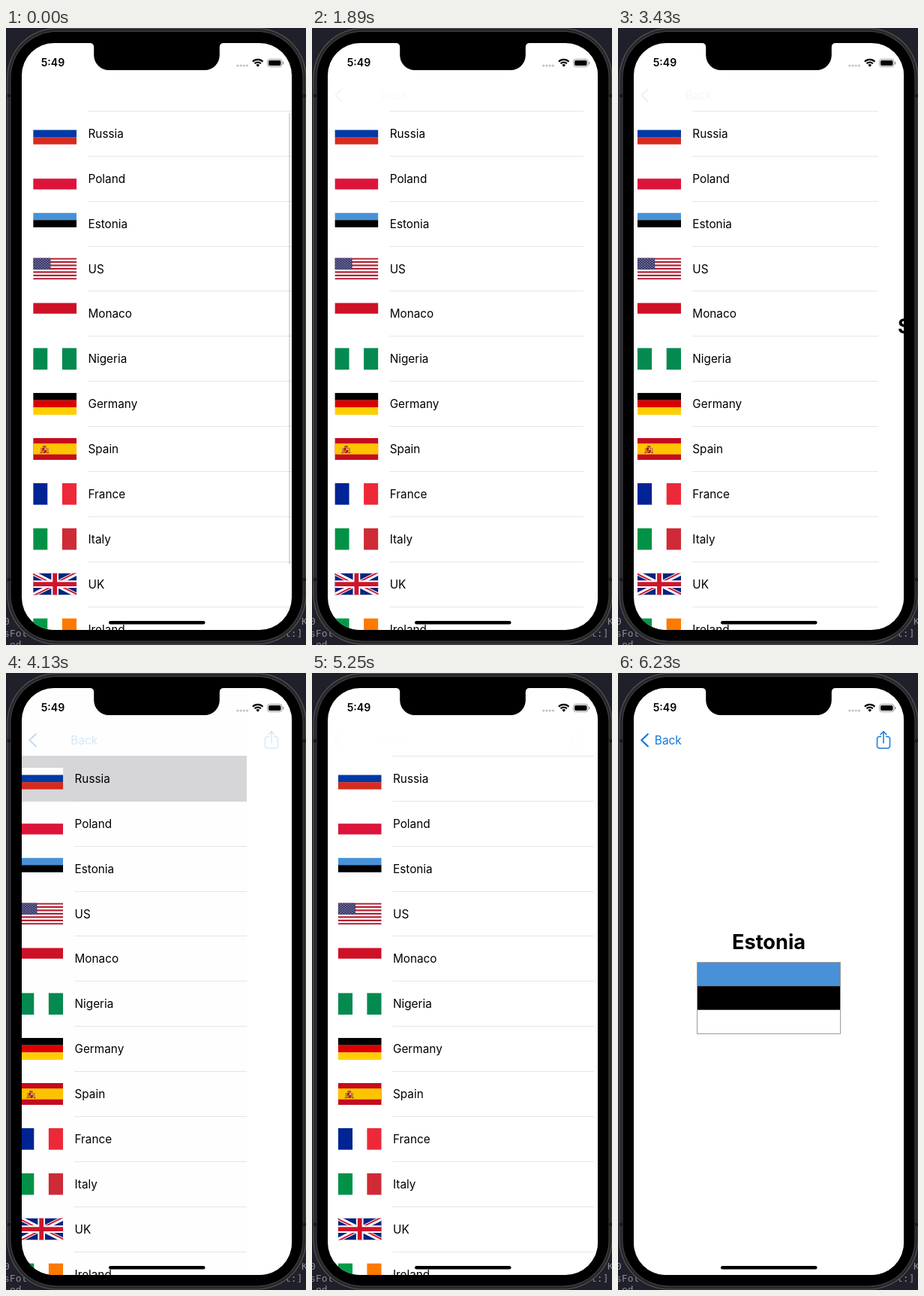
Animation, 400 px wide and 820 px high, one loop 6.86 s. Source, as an HTML page with a canvas:

```html
<!DOCTYPE html>
<html lang="en">
<head>
<meta charset="utf-8">
<title>Flag list</title>
<style>
  html, body { margin: 0; width: 100%; height: 100%; overflow: hidden; background: #20202b; }
  canvas { display: block; width: 400px; height: 820px; }
</style>
</head>
<body>
<canvas id="stage" width="400" height="820"></canvas>
<script>
const ctx = document.getElementById('stage').getContext('2d');
const LOOP = 6860, STEP = 70;
const SCREEN = { x: 21, y: 20, w: 360, h: 780 };
const ROW_TOP = 110, ROW_H = 59.87;
const SANS = 'Inter, "Liberation Sans", sans-serif';
const MONO = '"DejaVu Sans Mono", monospace';
const BLUE = '#1279dc';

const rows = [
  { name: 'Russia', bands: ['#fff', '#0039a6', '#d62b1f'] },
  { name: 'Poland', bands: ['#fff', '#dc143c'] },
  { name: 'Estonia', bands: ['#4891d9', '#000', '#fff'] },
  { name: 'US', draw: drawStarsAndStripes },
  { name: 'Monaco', bands: ['#ce1126', '#fff'] },
  { name: 'Nigeria', upright: true, bands: ['#048a51', '#fff', '#048a51'] },
  { name: 'Germany', bands: ['#000', '#dd0000', '#ffce00'] },
  { name: 'Spain', draw: drawSpain },
  { name: 'France', upright: true, bands: ['#002395', '#fff', '#ed2939'] },
  { name: 'Italy', upright: true, bands: ['#009246', '#fff', '#ce2b37'] },
  { name: 'UK', draw: drawUnion },
  { name: 'Ireland', upright: true, bands: ['#009a49', '#fff', '#ff7900'] }
];

// Each visit opens a detail page; only some of them load successfully.
const visits = [
  { row: 0, tap: 490, push: 742, press: 1540, pop: 1635 },
  { row: 0, tap: 2120, push: 2350, press: 3080, pop: 3213 },
  { row: 0, tap: 3860, push: 4090, press: 4830, pop: 4907, loaded: true },
  { row: 2, tap: 5480, push: 5710, press: Infinity, pop: Infinity, loaded: true }
];

function rect(x, y, w, h, color) {
  ctx.fillStyle = color;
  ctx.fillRect(x, y, w, h);
}

function roundRect(x, y, w, h, r, color) {
  ctx.beginPath();
  ctx.roundRect(x, y, w, h, r);
  ctx.fillStyle = color;
  ctx.fill();
}

function line(points, color, width) {
  ctx.beginPath();
  points.forEach(([x, y], i) => i ? ctx.lineTo(x, y) : ctx.moveTo(x, y));
  ctx.strokeStyle = color;
  ctx.lineWidth = width;
  ctx.stroke();
}

function text(str, x, y, font, color, align = 'left') {
  ctx.font = font;
  ctx.fillStyle = color;
  ctx.textAlign = align;
  ctx.fillText(str, x, y);
}

// Critically damped spring, 0 to 1.
function spring(ms) {
  const k = 18.26 * Math.max(0, ms) / 1000;
  return 1 - (1 + k) * Math.exp(-k);
}

function drawStarsAndStripes(w, h) {
  const s = h / 13;
  rect(0, 0, w, h, '#fff');
  for (let i = 0; i < 13; i += 2) rect(0, i * s, w, s, '#b22234');
  rect(0, 0, w * 0.4, s * 7, '#3c3b6e');
  for (let j = 0; j < 9; j++) {
    for (let i = j % 2; i < 11; i += 2) {
      rect(1.4 + i * 1.95, 1.2 + j * 1.6, 0.8, 0.8, '#fff');
    }
  }
}

function drawSpain(w, h) {
  rect(0, 0, w, h, '#c60b1e');
  rect(0, h / 4, w, h / 2, '#ffc400');
  rect(10, 13, 1.3, 7, '#a4705c');
  rect(19, 13, 1.3, 7, '#a4705c');
  rect(9, 19, 3, 1.2, '#8c4a3a');
  rect(18, 19, 3, 1.2, '#8c4a3a');
  roundRect(12, 13, 6, 7, [0, 0, 3, 3], '#ad1519');
  rect(15, 13.5, 2.4, 2.6, '#e3b9a4');
  rect(12.8, 16.5, 2, 2, '#d9a520');
  roundRect(12.7, 10.2, 4.8, 2.4, 1, '#a2403a');
}

function drawUnion(w, h) {
  const cx = w / 2, cy = h / 2;
  const cross = (color, width) => {
    line([[cx, 0], [cx, h]], color, width);
    line([[0, cy], [w, cy]], color, width);
  };
  rect(0, 0, w, h, '#00247d');
  line([[0, 0], [w, h]], '#fff', 5.8);
  line([[w, 0], [0, h]], '#fff', 5.8);
  // The red arms sit to one side of each diagonal, like a pinwheel.
  for (const [dx, dy] of [[-cx, -cy], [cx, -cy], [cx, cy], [-cx, cy]]) {
    const ox = dy / Math.hypot(dx, dy), oy = -dx / Math.hypot(dx, dy);
    line([[cx + ox, cy + oy], [cx + dx * 1.1 + ox, cy + dy * 1.1 + oy]], '#cf142b', 1.9);
  }
  cross('#fff', 9.7);
  cross('#cf142b', 5.8);
}

function drawFlag(flag, x, y, w, h) {
  ctx.save();
  ctx.beginPath();
  ctx.rect(x, y, w, h);
  ctx.clip();
  ctx.translate(x, y);
  if (flag.draw) flag.draw(w, h);
  else flag.bands.forEach((color, i) => {
    const n = flag.bands.length;
    if (flag.upright) rect(i * w / n, 0, w / n, h, color);
    else rect(0, i * h / n, w, h / n, color);
  });
  ctx.restore();
}

function drawBackdrop() {
  rect(0, 0, 400, 820, '#20202b');
  const font = '13px ' + MONO;
  const gray = '#8c8c94';
  text('0', -3, 793, font, gray);
  text('sFol', -3, 809, font, gray);
  text('ed', 5, 824, font, gray);
  text('K', 394, 793, font, gray);
  text('t:]', 372, 809, font, gray);
}

function drawBody() {
  roundRect(1.5, 0, 399, 819.5, 66, '#58585a');
  roundRect(2.5, 1, 397, 817.5, 65, '#272729');
  roundRect(5.5, 4, 391, 811.5, 62, '#444446');
  roundRect(6.5, 5, 389, 809.5, 61, '#000');
  for (const y of [88, 731]) {
    rect(2, y, 4, 4, '#19191b');
    rect(396, y, 4, 4, '#19191b');
  }
}

function drawList(shown, selected, indicator) {
  ctx.save();
  ctx.translate(SCREEN.x - 108 * shown, 0);
  rect(0, SCREEN.y, 470, SCREEN.h, '#fff');
  rows.forEach((row, i) => {
    rect(88, Math.round(ROW_TOP + i * ROW_H), 382, 1, '#e6e6e7');
  });
  if (selected >= 0) {
    rect(0, ROW_TOP + selected * ROW_H, 470, ROW_H + 1, '#d7d7da');
  }
  rows.forEach((row, i) => {
    const mid = ROW_TOP + (i + 0.5) * ROW_H + 0.4;
    drawFlag(row, 15.2, mid - 14.5, 58, 29);
    text(row.name, 88.5, mid + 5.6, '15.3px ' + SANS, '#000');
  });
  ctx.restore();
  if (indicator > 0) roundRect(377, 113, 2.5, 600, 1.2, `rgba(0,0,0,${0.14 * indicator})`);
  rect(SCREEN.x, SCREEN.y, SCREEN.w, SCREEN.h, `rgba(0,0,0,${0.106 * shown * shown})`);
}

function drawFailure() {
  text('Something went wrong!', 201, 406, 'bold 26.5px ' + SANS, '#000', 'center');
  rect(191, 423, 20, 18, '#fff');
  ctx.strokeStyle = '#a0a0a0';
  ctx.lineWidth = 1;
  ctx.strokeRect(191.5, 423.5, 18.5, 17.5);
  ctx.beginPath();
  for (let i = 0; i < 8; i++) {
    const a = (i + 0.5) * Math.PI / 4;
    ctx.lineTo(200.8 + 8.6 * Math.cos(a), 432.3 + 8.6 * Math.sin(a));
  }
  ctx.fillStyle = '#0878ec';
  ctx.fill();
  line([[197.8, 429.3], [203.8, 435.3]], '#fff', 1.8);
  line([[203.8, 429.3], [197.8, 435.3]], '#fff', 1.8);
}

function drawDetail(shown, visit) {
  ctx.save();
  ctx.translate(Math.round(SCREEN.w * (1 - shown)), 0);
  rect(SCREEN.x, SCREEN.y, SCREEN.w, SCREEN.h, '#fff');
  if (visit.loaded) {
    const row = rows[visit.row];
    text(row.name, 201, 367.3, 'bold 27.2px ' + SANS, '#000', 'center');
    drawFlag(row, 105.5, 384.5, 191, 95);
    ctx.strokeStyle = '#9c9c9c';
    ctx.lineWidth = 1;
    ctx.strokeRect(105.5, 384.5, 191, 95);
  } else {
    drawFailure();
  }
  ctx.restore();
}

function drawShare() {
  line([[350.5, 84.5], [347.5, 84.5], [345.5, 86.5], [345.5, 98], [347.5, 100],
        [360.5, 100], [362.5, 98], [362.5, 86.5], [360.5, 84.5], [357.5, 84.5]], BLUE, 1.5);
  line([[354, 93], [354, 78]], BLUE, 1.5);
  line([[350.2, 81.6], [354, 77.8], [357.8, 81.6]], BLUE, 1.5);
}

function drawNav(t, shown, visit) {
  let strength = 1;
  if (t >= visit.press) strength = 0.2 + 0.8 * Math.min(1, Math.max(0, t - visit.pop) / 400);
  ctx.save();
  ctx.lineJoin = ctx.lineCap = 'round';
  ctx.globalAlpha = Math.min(1, shown * 1.5) * strength;
  line([[39.8, 81.2], [31.3, 89.3], [39.8, 97.4]], BLUE, 2.2);
  ctx.globalAlpha = shown * strength;
  text('Back', 48.8 + 45 * (1 - shown), 95, '15.4px ' + SANS, BLUE);
  ctx.globalAlpha = shown;
  if (visit.loaded) drawShare();
  ctx.restore();
}

function drawStatus() {
  text('5:49', 62.5, 51.3, '600 14.1px ' + SANS, '#000', 'center');
  for (let i = 0; i < 4; i++) {
    ctx.beginPath();
    ctx.arc(308.8 + i * 4.2, 50, 1.6, 0, Math.PI * 2);
    ctx.fillStyle = '#c2c2c4';
    ctx.fill();
  }
  for (const r of [9.6, 5.9]) {
    ctx.beginPath();
    ctx.arc(335.7, 51.5, r, -Math.PI * 0.75, -Math.PI * 0.25);
    ctx.strokeStyle = '#000';
    ctx.lineWidth = 2.1;
    ctx.stroke();
  }
  ctx.beginPath();
  ctx.moveTo(335.7, 51.8);
  ctx.arc(335.7, 51.5, 3.4, -Math.PI * 0.75, -Math.PI * 0.25);
  ctx.fillStyle = '#000';
  ctx.fill();
  ctx.beginPath();
  ctx.roundRect(348.5, 41.5, 19.5, 10, 3);
  ctx.strokeStyle = '#9a9a9a';
  ctx.lineWidth = 1;
  ctx.stroke();
  roundRect(350, 43, 16.5, 7, 1.8, '#000');
  roundRect(369, 44.8, 1.4, 3.6, [0, 1, 1, 0], '#9a9a9a');
}

function drawNotch() {
  const left = 117.2, right = 284.8, bottom = 56, r = 20;
  ctx.beginPath();
  ctx.moveTo(left - 5.5, 19);
  ctx.lineTo(left - 5.5, 20);
  ctx.quadraticCurveTo(left, 20, left, 25.5);
  ctx.arcTo(left, bottom, left + r, bottom, r);
  ctx.arcTo(right, bottom, right, bottom - r, r);
  ctx.lineTo(right, 25.5);
  ctx.quadraticCurveTo(right, 20, right + 5.5, 20);
  ctx.lineTo(right + 5.5, 19);
  ctx.fillStyle = '#000';
  ctx.fill();
}

function render(t) {
  const visit = visits.filter(v => v.tap <= t).pop();
  let shown = 0, selected = -1;
  if (visit) {
    shown = t < visit.pop ? spring(t - visit.push) : 1 - spring(t - visit.pop);
    if (t < visit.pop) selected = visit.row;
  }
  drawBackdrop();
  drawBody();
  ctx.save();
  ctx.beginPath();
  ctx.roundRect(SCREEN.x, SCREEN.y, SCREEN.w, SCREEN.h, 43);
  ctx.clip();
  drawList(shown, selected, 1 - t / 140);
  if (shown > 0) {
    drawDetail(shown, visit);
    drawNav(t, shown, visit);
  }
  drawStatus();
  roundRect(137, 787.9, 128.5, 4.6, 2.3, '#000');
  ctx.restore();
  drawNotch();
}

const start = performance.now();
function tick() {
  const t = (performance.now() - start) % LOOP;
  render(Math.floor(t / STEP) * STEP);
  requestAnimationFrame(tick);
}
tick();
</script>
</body>
</html>
```
